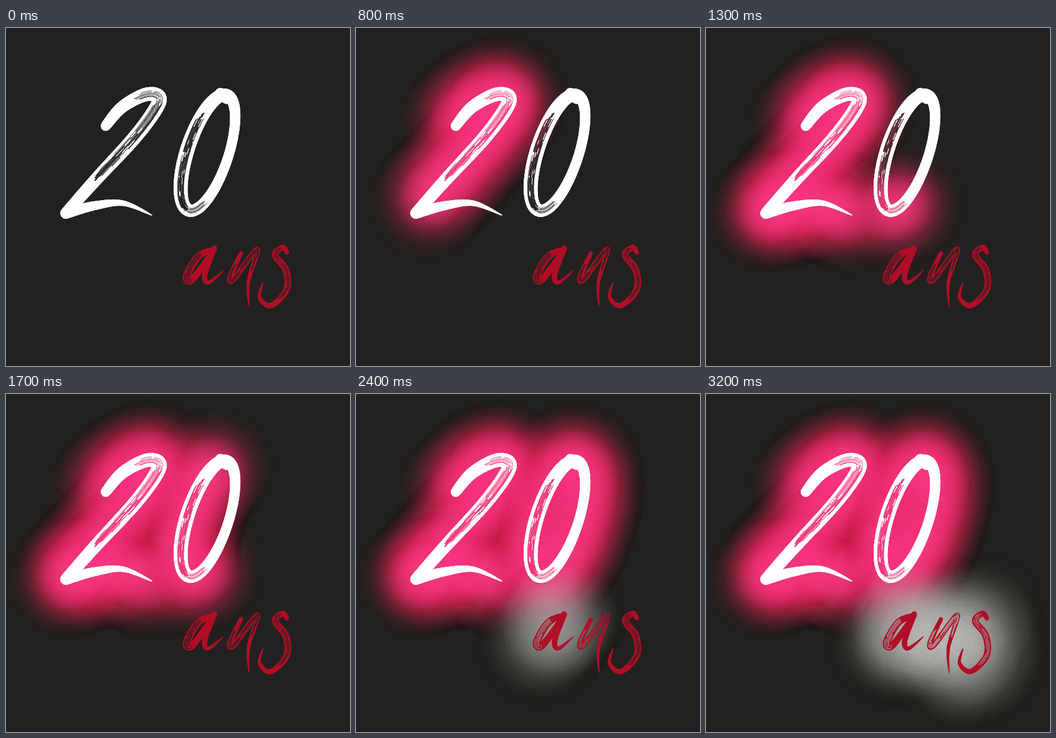
Write an HTML page with a canvas that moves like this. It is 552 px wide and 542 px high and loops after 3300 ms.

```html
<!DOCTYPE html>
<html lang="fr">
<head>
<meta charset="utf-8">
<title>20 ans</title>
<style>
  html, body { margin: 0; width: 100%; height: 100%; overflow: hidden; background: #22211f; }
  canvas { display: block; }
</style>
</head>
<body>
<canvas id="stage" width="552" height="542"></canvas>
<script>
const W = 552, H = 542, STEP = 100, STEPS = 33, SUB = 24;
const WHITE = '#fff', RED = '#b00f27';
const ctx = document.getElementById('stage').getContext('2d');

let seed = 20;
const rnd = () => (seed = (seed * 16807) % 2147483647) / 2147483647;
const between = (a, b) => a + (b - a) * rnd();
const clamp = v => Math.min(1, Math.max(0, v));

function layer(w, h) {
  const c = document.createElement('canvas');
  c.width = w;
  c.height = h;
  return c;
}

// Catmull-Rom curve whose width swells from a over m to b; gives [x, y, width]
function curve([a, m, b], ...pts) {
  const out = [], last = pts.length - 1;
  for (let n = 0; n <= last * SUB; n++) {
    const i = Math.min(Math.floor(n / SUB), last - 1), t = n / SUB - i, u = n / (last * SUB);
    const p0 = pts[Math.max(i - 1, 0)], p1 = pts[i], p2 = pts[i + 1], p3 = pts[Math.min(i + 2, last)];
    const [x, y] = p1.map((v, k) => v + 0.5 * t * (p2[k] - p0[k] +
      t * (2 * p0[k] - 5 * v + 4 * p2[k] - p3[k] +
      t * (3 * v - p0[k] - 3 * p2[k] + p3[k]))));
    out.push([x, y, (1 - u) ** 2 * a + 2 * u * (1 - u) * m + u * u * b]);
  }
  return out;
}

// Slanted ellipse, heavier on its left side, drawn from the bottom right
function ring(cx, cy, rx, ry, slant) {
  return Array.from({ length: 241 }, (_, i) => {
    const a = i / 240 * 2 * Math.PI - 0.6, dy = ry * Math.cos(a);
    return [cx - rx * Math.sin(a) - slant * dy, cy + dy, 19.5 + 3.5 * Math.sin(a)];
  });
}

const two = curve([16, 29, 18], [160, 157], [186, 127], [223, 107], [245, 110],
  [240, 130], [206, 176], [147, 240], [96, 297]);
const foot = curve([18, 14, 1.5], [96, 297], [142, 285], [188, 281], [234, 300]);
const zero = ring(324, 200, 34.5, 93, 0.29);
const knob = curve([18, 17, 9], [344, 105], [354, 117]);
const bowl = curve([8, 16, 8], [334, 355], [309, 366], [290, 398], [300, 402], [334, 355]);
const tail = curve([9, 10, 1], [334, 353], [319, 395], [325, 408], [349, 389]);
const arch = curve([6, 14, 1], [377, 361], [360, 398], [366, 402], [403, 355], [389, 407], [390, 447]);
const ess = curve([1.5, 17, 6], [412, 409], [407, 432], [425, 445], [450, 420],
  [449, 388], [432, 364], [444, 352], [451, 360]);

function brush(g, color, line) {
  g.strokeStyle = color;
  g.lineCap = 'round';
  for (let i = 1; i < line.length; i++) {
    g.lineWidth = line[i][2];
    g.beginPath();
    g.moveTo(line[i - 1][0], line[i - 1][1]);
    g.lineTo(line[i][0], line[i][1]);
    g.stroke();
  }
}

// Dry-brush gaps: broken lanes cut out alongside a stroke
function scratch(g, line, from, to, lo, hi, lanes, weight) {
  const span = (to - from) * line.length;
  g.save();
  g.globalCompositeOperation = 'destination-out';
  g.lineCap = 'butt';
  for (let n = 0; n < lanes; n++) {
    const f = n / (lanes - 1), off = lo + (hi - lo) * f, trim = Math.abs(f - 0.5) * span * 0.4;
    const end = Math.min(to * line.length - between(0, trim), line.length - 2);
    let i = Math.max(1, Math.round(from * line.length + between(0, trim)));
    while (i < end) {
      const stop = Math.min(end, i + between(10, 45));
      g.lineWidth = between(0.8, 1.9) * weight;
      g.beginPath();
      for (; i <= stop; i++) {
        const [ax, ay] = line[i - 1], [bx, by] = line[i + 1], [x, y, w] = line[i];
        const o = (off * w + between(-0.15, 0.15)) / (Math.hypot(bx - ax, by - ay) || 1);
        g.lineTo(x - (by - ay) * o, y + (bx - ax) * o);
      }
      g.stroke();
      i += Math.round(between(0, 5));
    }
  }
  g.restore();
}

function lettering() {
  const c = layer(W, H), g = c.getContext('2d');
  brush(g, WHITE, two);
  scratch(g, two, 0.22, 0.54, -0.22, 0.18, 5, 0.8);
  scratch(g, two, 0.5, 0.87, -0.2, 0.28, 8, 1.1);
  brush(g, WHITE, foot);
  brush(g, WHITE, zero);
  scratch(g, zero, 0, 0.22, -0.2, 0.22, 6, 0.7);
  scratch(g, zero, 0.12, 0.47, -0.22, 0.2, 8, 1.15);
  brush(g, WHITE, knob);
  brush(g, RED, bowl);
  scratch(g, bowl, 0.2, 0.75, -0.25, 0.28, 4, 0.8);
  brush(g, RED, tail);
  brush(g, RED, arch);
  scratch(g, arch, 0.08, 0.75, -0.22, 0.25, 4, 0.65);
  brush(g, RED, ess);
  scratch(g, ess, 0.35, 0.85, -0.22, 0.25, 4, 0.65);
  return c;
}

// Soft round stamp with alpha peak * (1 - d^2)^k
function dab(r, rgb, peak, k) {
  const c = layer(r * 2, r * 2), g = c.getContext('2d');
  const fill = g.createRadialGradient(r, r, 0, r, r, r);
  for (let d = 0; d <= 20; d++) {
    fill.addColorStop(d / 20, `rgba(${rgb},${peak * (1 - (d / 20) ** 2) ** k})`);
  }
  g.fillStyle = fill;
  g.fillRect(0, 0, r * 2, r * 2);
  return c;
}

// Points at an even distance along several strokes
function spread(lines, gap) {
  const out = [];
  for (const line of lines) {
    let run = gap;
    line.forEach(([x, y], i) => {
      if (i) run += Math.hypot(x - line[i - 1][0], y - line[i - 1][1]);
      if (run >= gap) {
        out.push([x, y]);
        run -= gap;
      }
    });
  }
  return out;
}

const rose = dab(112, '222,48,92', 0.27, 3);
const hot = dab(62, '255,60,138', 0.22, 2);
const grey = dab(116, '222,222,218', 0.06, 2.5);

// The light follows the pen: each word part takes a number of steps
const parts = [
  { first: 0, steps: 12, dots: spread([two, foot], 10), stamps: [rose, hot] },
  { first: 12, steps: 9, dots: spread([zero], 10), stamps: [rose, hot] },
  { first: 21, steps: 11, dots: spread([bowl, tail, arch, ess], 10), stamps: [grey] }
];

function paintGlow(step) {
  for (const stamp of [rose, hot, grey]) {
    const r = stamp.width / 2;
    for (const { first, steps, dots, stamps } of parts) {
      if (!stamps.includes(stamp)) continue;
      const count = Math.round(dots.length * clamp((step - first) / steps));
      for (const [x, y] of dots.slice(0, count)) ctx.drawImage(stamp, x - r, y - r);
    }
  }
}

const letters = lettering();
let shown = -1;

function draw(step) {
  ctx.fillStyle = '#22211f';
  ctx.fillRect(0, 0, W, H);
  paintGlow(step);
  ctx.fillStyle = '#231f20';
  ctx.fillRect(0, H - 4, W, 4);
  ctx.drawImage(letters, 0, 0);
}

const start = performance.now();
function tick() {
  const step = Math.floor(Math.max(0, performance.now() - start) / STEP) % STEPS;
  if (step !== shown) draw(shown = step);
  requestAnimationFrame(tick);
}
draw(shown = 0);
requestAnimationFrame(tick);
</script>
</body>
</html>
```
